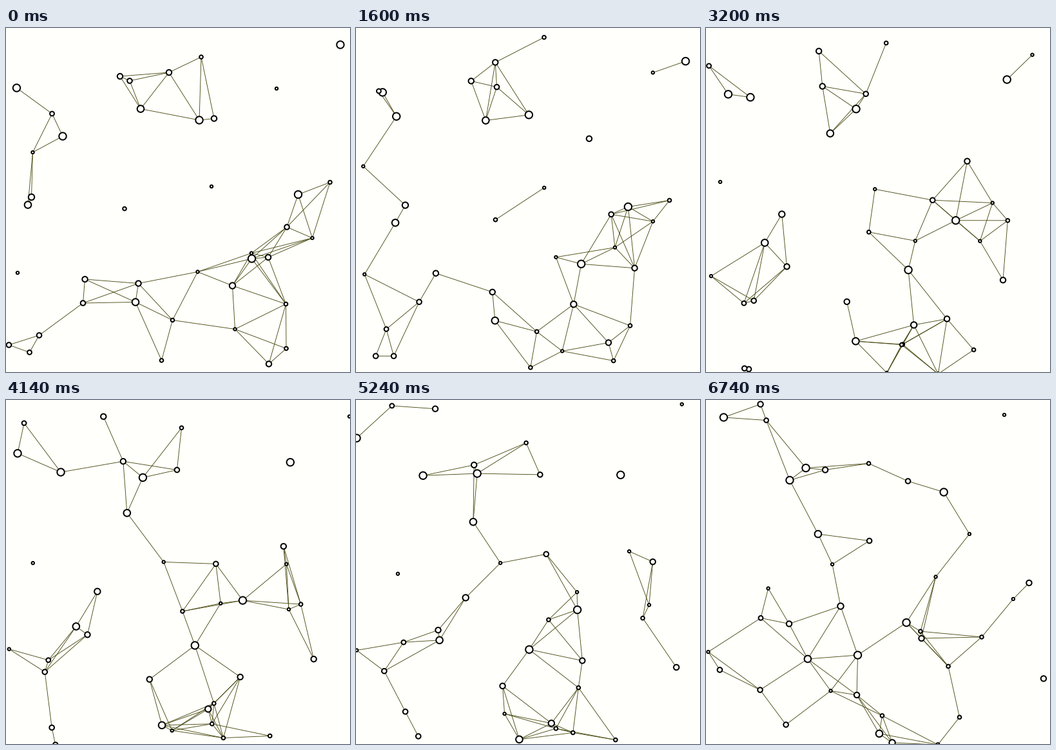
Write a matplotlib script that moves like this. It is 534 px wide and 534 px high and loops after 6.78 s.

```python
import numpy as np
import matplotlib.pyplot as plt
from matplotlib.animation import FuncAnimation
from matplotlib.collections import LineCollection

SIZE, DPI = 534, 100
PX = 72 / DPI                      # one pixel in points
LOOP, INTERVAL = 6780, 20          # ms
HOLD = 200                         # ms before the dots start to move
REACH = 100                        # dots closer than this are linked
LOW = np.array([-0.2, 1.9])        # walls the dot centres bounce off
SPAN = np.array([535.4, 535.5])
PAPER, INK, THREAD = "#fffffc", "#000000", "#4a4a12"

start, speed, radius = [], [], []


def add_dots(r, *dots):
    """Each dot is x, y and its velocity in pixels per step."""
    for x, y, vx, vy in dots:
        start.append((x, y))
        speed.append((vx, vy))
        radius.append(r)


add_dots(5.7,
         (519, 26, 0.925, 0.594), (300, 143, -0.736, -0.190),
         (16.5, 93, 0.576, 0.160), (88, 168, -0.588, -0.716),
         (453.5, 258.5, -0.723, 0.442), (381.5, 358, -0.741, 0.193))
add_dots(5.3,
         (209, 125.5, -0.178, 0.419), (34, 274.5, 0.629, 0.647),
         (201, 425.5, 0.345, 0.667))
add_dots(4.7,
         (39.5, 262.5, 0.860, 0.292), (351.5, 400, -0.317, 0.670))
add_dots(4.2,
         (253, 69, -0.855, -0.364), (177, 75, 0.041, 0.170),
         (323, 140.5, 0.906, 0.728), (407, 356, 0.594, 0.388),
         (408, 521.5, -0.373, -0.769), (205.5, 396.5, 0.145, 0.312),
         (122.5, 390, 0.033, -0.216))
add_dots(3.8,
         (192, 82, 0.617, 0.223), (436, 309, -0.926, -0.459),
         (119.5, 427, -0.498, -0.041), (51.5, 477, 0.165, 0.750),
         (4.5, 492, 0.607, 0.400))
add_dots(3.4,
         (71.5, 133, -0.840, -0.816), (36.5, 503.5, 0.246, -0.838))
add_dots(2.8,
         (303, 45, -0.256, -0.709), (184, 280.5, 0.756, 0.399),
         (503, 239.5, -0.381, 0.652), (434.5, 428.5, -0.208, 0.781),
         (435, 497.5, -0.820, 0.443), (258.5, 453.5, 0.515, 0.414),
         (241.5, 516, 0.683, 0.738))
add_dots(2.2,
         (420, 94, 0.951, -0.575), (41.5, 193, -0.703, 0.505),
         (319, 246, -0.624, 0.046), (475.5, 326, -0.338, -0.599),
         (381, 349.5, 0.487, -0.206), (297.5, 378.5, 0.300, -0.528),
         (355.5, 467.5, -0.822, 0.791), (18, 380, -0.111, 0.056))

start, speed, radius = map(np.array, (start, speed, radius))
first, second = np.triu_indices(len(start), 1)


def positions(step):
    """Straight travel, folded back at the walls."""
    q = (start + speed * step - LOW) % (2 * SPAN)
    return LOW + SPAN - np.abs(q - SPAN)


fig = plt.figure(figsize=(SIZE / DPI, SIZE / DPI), dpi=DPI, facecolor=PAPER)
ax = fig.add_axes([0, 0, 1, 1])
ax.set(xlim=(0, SIZE), ylim=(SIZE, 0))
ax.axis("off")

links = LineCollection([], colors=THREAD, linewidths=0.9 * PX, zorder=1)
links.set_snap(False)
ax.add_collection(links, autolim=False)
dots = ax.scatter(*start.T, s=(2 * radius * PX) ** 2, facecolors=PAPER,
                  edgecolors=INK, linewidths=2 * PX, zorder=2)
dots.set_snap(False)


def draw(i):
    # thirty steps per second once the hold is over
    step = max(0, (i * INTERVAL - HOLD) * 3 // 100 + 1)
    pos = positions(step)
    a, b = pos[first], pos[second]
    near = np.hypot(*(a - b).T) < REACH
    links.set_segments(np.stack([a[near], b[near]], axis=1))
    dots.set_offsets(pos)
    return links, dots


anim = FuncAnimation(fig, draw, frames=LOOP // INTERVAL, interval=INTERVAL,
                     repeat=True, repeat_delay=0)
plt.show()
```
